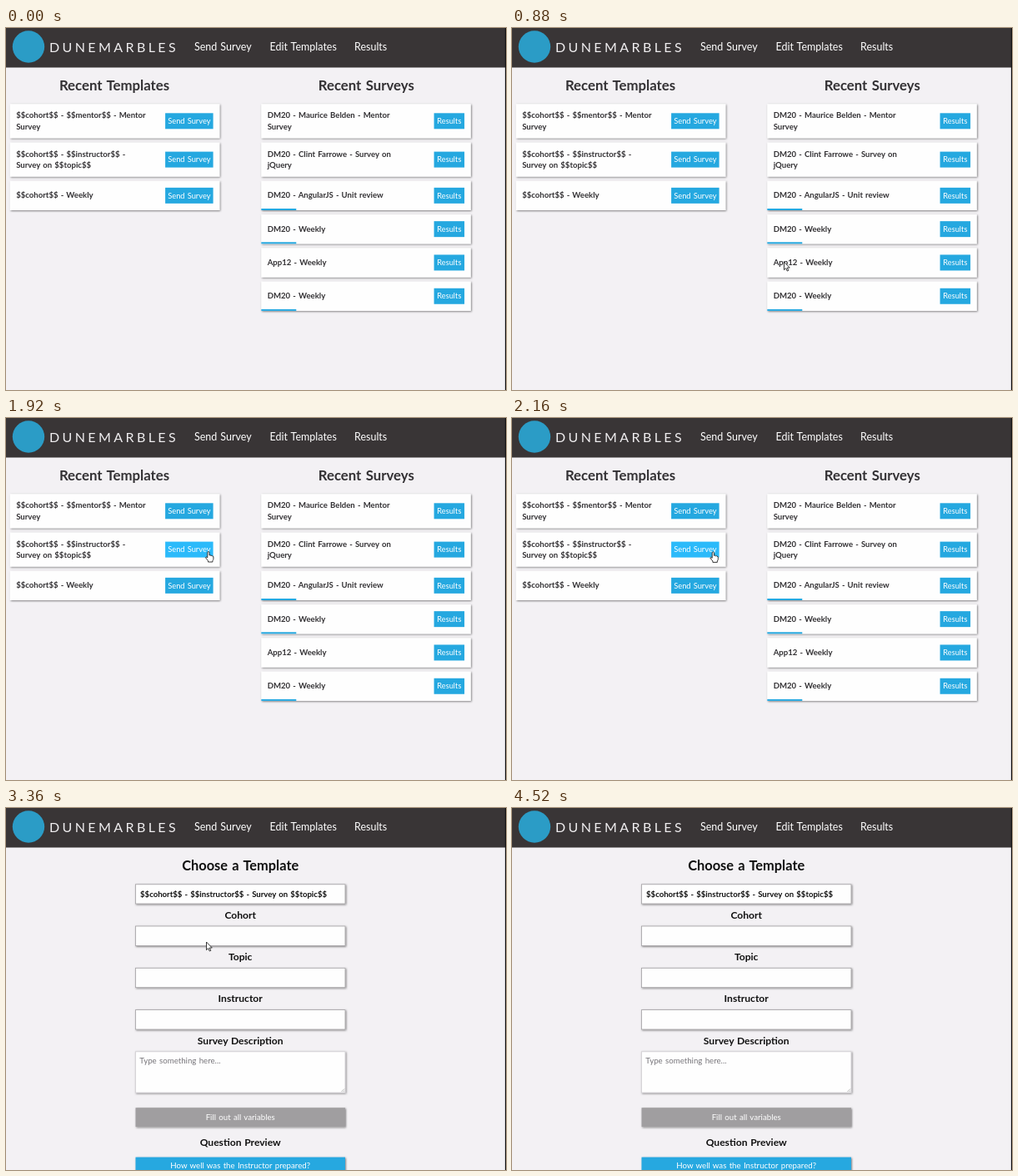
These frames come from a looping animation (600 px wide and 435 px high, 4.64 s). An HTML page:

```html
<!DOCTYPE html>
<html lang="en">
<head>
<meta charset="utf-8">
<title>Survey dashboard</title>
<style>
  html, body { margin: 0; width: 100%; height: 100%; overflow: hidden; background: #f3f1f4; }
  svg { display: block; width: 100%; height: 100%; }
  text { font-family: Lato, "Open Sans", sans-serif; white-space: pre; word-spacing: .8px; }
  .brand { font-size: 16px; letter-spacing: 3.4px; fill: #f0eef0; }
  .nav { font-size: 12.5px; fill: #fff; }
  .title { font-size: 16.4px; font-weight: 700; word-spacing: 1.3px; }
  .label { font-size: 12.1px; font-weight: 700; }
  .item { font-size: 9.6px; font-weight: 700; }
  .button { font-size: 9.3px; fill: #fff; }
  .wide { font-size: 9.7px; fill: #fff; }
  .hint { font-size: 9.7px; fill: #77757a; }
  .mid { text-anchor: middle; }
  #dashboard { fill: #333134; }
  #dashboard .title { font-size: 16.8px; }
  #form { fill: #111; }
</style>
</head>
<body>
<svg id="stage" viewBox="0 0 600 435" xmlns="http://www.w3.org/2000/svg">
  <defs>
    <filter id="shadow" x="-5%" y="-20%" width="110%" height="150%">
      <feDropShadow dx=".9" dy=".9" stdDeviation=".8" flood-color="#000" flood-opacity=".5"/>
    </filter>
  </defs>
  <rect width="600" height="435" fill="#f3f1f4"/>
  <g id="dashboard"></g>
  <g id="form"></g>
  <g id="header"></g>
  <rect x="598.9" width="1.1" height="435" fill="#111"/>
  <g id="cursor" stroke="#222" stroke-width=".9" stroke-linejoin="round" fill="#fff">
    <path id="arrow" d="M0 0V9.6L2.3 7.6L3.8 11L5.3 10.3L3.8 7H6.8Z"/>
    <path id="hand" d="M-1.1 .8Q0 -.7 1.1 .8V4.6Q2.3 3.8 3 5Q4.2 4.4 4.7 5.5Q6 5.2 6 6.6V9Q5.8 10.3 5 11.2V12.6H-.4V11.2Q-2 9.5-3.5 7.2Q-3.3 5.8-1.1 7.4Z"/>
  </g>
</svg>
<script>
const LOOP = 4640;
const BLUE = [37, 168, 224];
const BRIGHT = [43, 186, 250];
const rgb = c => `rgb(${c.map(Math.round).join()})`;
const byId = id => document.getElementById(id);

function add(parent, tag, attrs, content) {
  const node = document.createElementNS("http://www.w3.org/2000/svg", tag);
  for (const key in attrs) node.setAttribute(key, attrs[key]);
  if (content) node.textContent = content;
  parent.appendChild(node);
  return node;
}
const box = (parent, x, y, width, height, fill, extra) =>
  add(parent, "rect", { x, y, width, height, fill, ...extra });
const label = (parent, x, y, kind, content) =>
  add(parent, "text", { x, y, class: kind }, content);
const SHADOW = { filter: "url(#shadow)" };

function buildHeader(g) {
  box(g, 0, 0, 599, 47.5, "#393536");
  add(g, "circle", { cx: 27, cy: 22.5, r: 19.2, fill: "#2b9cc6" });
  label(g, 52, 28.6, "brand", "DUNEMARBLES");
  label(g, 226, 27, "nav", "Send Survey");
  label(g, 316.5, 27, "nav", "Edit Templates");
  label(g, 418, 27, "nav", "Results");
}

// One card; returns its button so it can be highlighted.
function card(g, x, y, lines, action, started) {
  const height = lines.length > 1 ? 41 : 35.3;
  const middle = y + height / 2;
  const width = action === "Results" ? 36.5 : 57.5;
  const buttonX = x + 243.8 - width;
  box(g, x, y, 251.5, height, "#fefefe", SHADOW);
  lines.forEach((line, i) =>
    label(g, x + 7.4, middle + 3.1 + (i - (lines.length - 1) / 2) * 13.2, "item", line));
  const button = box(g, buttonX, middle - 9.5, width, 19, rgb(BLUE));
  label(g, buttonX + width / 2, middle + 3.2, "button mid", action);
  if (started) box(g, x, y + height - 2, 42, 2, rgb(BLUE));
  return button;
}

function buildDashboard(g) {
  label(g, 130, 75, "title mid", "Recent Templates");
  label(g, 432.3, 75, "title mid", "Recent Surveys");
  const left = (y, ...lines) => card(g, 4.8, y, lines, "Send Survey");
  const right = (y, started, ...lines) => card(g, 306.3, y, lines, "Results", started);
  left(91.3, "$$cohort$$ - $$mentor$$ - Mentor", "Survey");
  const target = left(137.6, "$$cohort$$ - $$instructor$$ -", "Survey on $$topic$$");
  left(183.7, "$$cohort$$ - Weekly");
  right(91.3, false, "DM20 - Maurice Belden - Mentor", "Survey");
  right(137.6, false, "DM20 - Clint Farrowe - Survey on", "jQuery");
  right(183.7, true, "DM20 - AngularJS - Unit review");
  right(224, true, "DM20 - Weekly");
  right(264.3, false, "App12 - Weekly");
  right(304.6, true, "DM20 - Weekly");
  return target;
}

function buildForm(g) {
  const x = 155.5, width = 251.5, center = 281.2;
  const field = (y, height, stroke = "#a3a1a4") =>
    box(g, x, y, width, height, "#fefefe", { stroke, "stroke-width": .8, ...SHADOW });
  label(g, center, 75, "title mid", "Choose a Template");
  field(91.8, 23.2);
  label(g, 161, 106.6, "item", "$$cohort$$ - $$instructor$$ - Survey on $$topic$$");
  ["Cohort", "Topic", "Instructor"].forEach((name, i) => {
    label(g, center, 132.6 + i * 50.3, "label mid", name);
    field(142 + i * 50.3, 23.4);
  });
  label(g, center, 283.8, "label mid", "Survey Description");
  field(292.8, 49.2, "#d0ced1");
  label(g, 160.3, 307.2, "hint", "Type something here...");
  add(g, "path", { d: "M402.5 341L406 337.5M404.7 341L406 339.7", stroke: "#888", "stroke-width": .6 });
  box(g, x, 360.2, width, 23, "#a09ea0", SHADOW);
  label(g, center, 374.7, "wide mid", "Fill out all variables");
  label(g, center, 405.6, "label mid", "Question Preview");
  box(g, x, 419.6, width, 23, rgb(BLUE), SHADOW);
  label(g, center, 432.7, "wide mid", "How well was the Instructor prepared?");
}

buildHeader(byId("header"));
buildForm(byId("form"));
const target = buildDashboard(byId("dashboard"));

const PAGE_CHANGE = 2200, CURSOR_IN = 200, CURSOR_OUT = 4040;
// Pointer stops: time, x, y
const STOPS = [
  [200, 402, 437], [480, 391.8, 376.3], [640, 391.8, 376.3],
  [1160, 245.1, 162.4], [1280, 245.1, 162.4], [1480, 242.9, 160.4],
  [2100, 242.9, 160.4], [2200, 240.5, 161]
];
const clamp = v => Math.min(1, Math.max(0, v));
const ease = v => v * v * (3 - 2 * v);
const mix = (a, b, v) => a + (b - a) * v;

function pointerAt(t) {
  const next = STOPS.findIndex(stop => stop[0] > t);
  if (next < 0) return STOPS[STOPS.length - 1].slice(1);
  if (next === 0) return STOPS[0].slice(1);
  const a = STOPS[next - 1], b = STOPS[next];
  const v = ease((t - a[0]) / (b[0] - a[0]));
  return [mix(a[1], b[1], v), mix(a[2], b[2], v)];
}

const show = (id, visible) => byId(id).setAttribute("display", visible ? "inline" : "none");

function render(t) {
  const onForm = t >= PAGE_CHANGE;
  const [x, y] = pointerAt(t);
  const overButton = !onForm && x < 248 && y < 167;
  const glow = ease(clamp((t - 1240) / 260));
  show("dashboard", !onForm);
  show("form", onForm);
  show("cursor", t >= CURSOR_IN && t < CURSOR_OUT);
  show("hand", overButton);
  show("arrow", !overButton);
  byId("cursor").setAttribute("transform", `translate(${x} ${y})`);
  target.setAttribute("fill", rgb(BLUE.map((c, i) => mix(c, BRIGHT[i], glow))));
}

function tick() {
  render(performance.now() % LOOP);
  requestAnimationFrame(tick);
}
tick();
</script>
</body>
</html>
```
